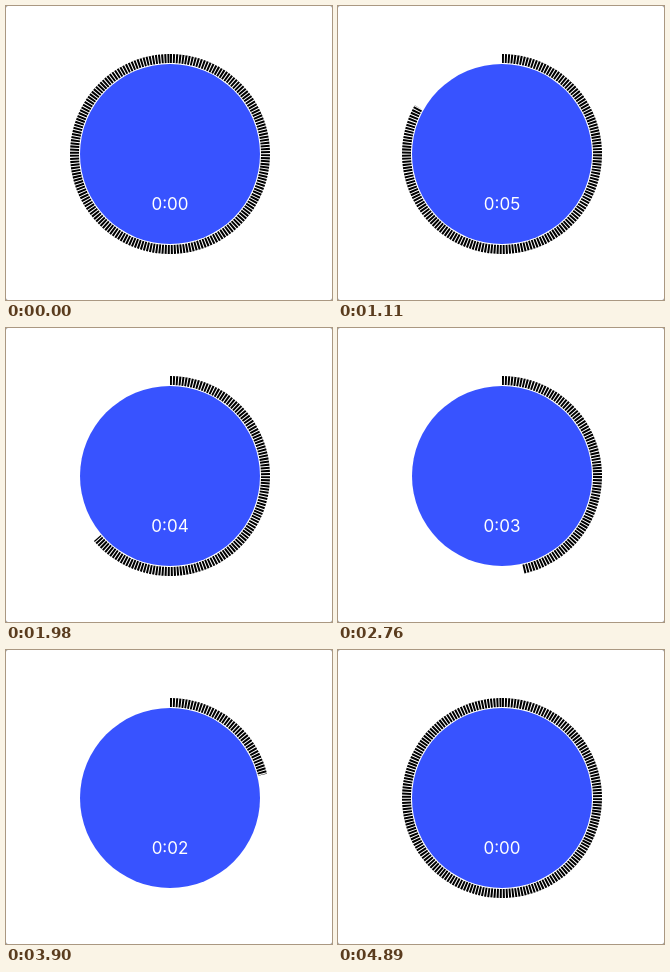
Recreate the animation shown at these times as an HTML page. Size 326 by 294 pixels, loop 4980 ms.

```html
<!DOCTYPE html>
<html lang="en">
<head>
<meta charset="utf-8">
<title>Countdown timer</title>
<style>
  html, body { margin: 0; width: 100%; height: 100%; overflow: hidden; background: #8c8c8c; }
  svg { display: block; width: 326px; height: 294px; background: #fff; border-radius: 2px; }
  text { font: 17px Inter, "Liberation Sans", sans-serif; fill: #fff; text-anchor: middle; }
</style>
</head>
<body>
<svg viewBox="0 0 326 294">
  <circle cx="164" cy="148" r="90" fill="#3853ff"/>
  <path id="ring" fill="none" stroke="#000" stroke-width="9" stroke-dasharray="2 1"/>
  <text id="label" x="164" y="204">0:00</text>
</svg>
<script>
  const LOOP = 4980, STEP = 30, LAST_STEP = 4890;
  const START = 349, SECOND = 900, SECONDS = 5, LABEL_LAG = 15;
  const CX = 164, CY = 148, RADIUS = 95.5;
  const ring = document.getElementById("ring");
  const label = document.getElementById("label");

  // Seconds left on the clock; zero while idle.
  function remaining(time) {
    const left = SECONDS - (time - START) / SECOND;
    return left > 0 && left <= SECONDS ? left : 0;
  }

  // Clockwise arc from twelve o'clock.
  function arc(fraction) {
    const angle = Math.min(fraction, 0.99999) * 2 * Math.PI;
    const x = CX + RADIUS * Math.sin(angle);
    const y = CY - RADIUS * Math.cos(angle);
    const large = fraction > 0.5 ? 1 : 0;
    return `M${CX} ${CY - RADIUS}A${RADIUS} ${RADIUS} 0 ${large} 1 ${x} ${y}`;
  }

  function draw(time) {
    const left = remaining(time);
    ring.setAttribute("d", arc(left ? left / SECONDS : 1));
    label.textContent = "0:0" + Math.ceil(remaining(time - (time > START + SECOND ? LABEL_LAG : 0)));
  }

  function tick() {
    const time = performance.now() % LOOP;
    draw(Math.min(Math.floor(time / STEP) * STEP, LAST_STEP));
    requestAnimationFrame(tick);
  }
  tick();
</script>
</body>
</html>
```
